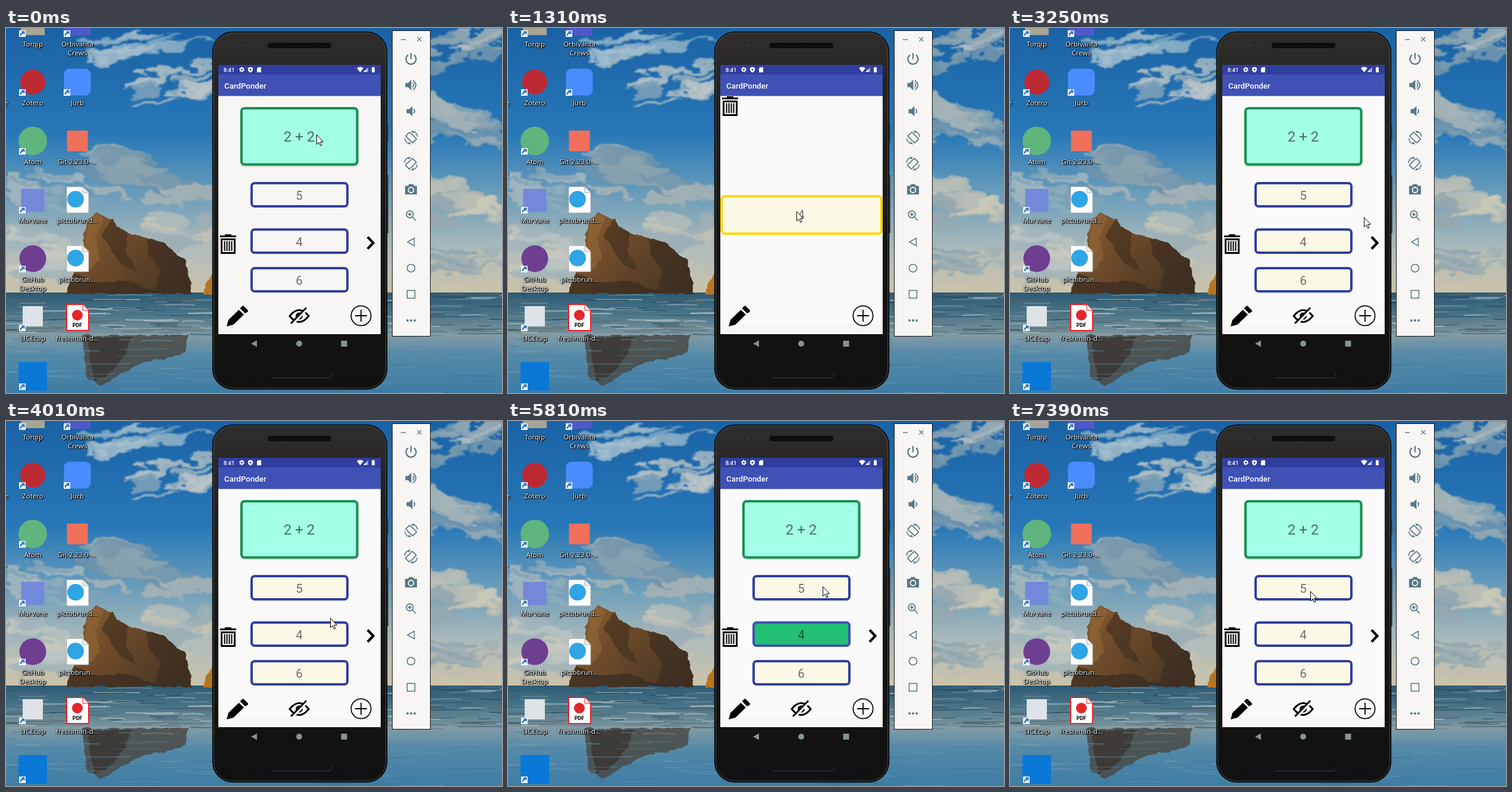
An HTML page for the animation above (7.99 s loop, 834x614 px).

```html
<!DOCTYPE html>
<html lang="en">
<head>
<meta charset="utf-8">
<title>Flash cards in a phone emulator</title>
<style>
  html, body { margin: 0; width: 100%; height: 100%; overflow: hidden; background: #1a65ab; }
  svg { display: block; width: 834px; height: 614px; }
  text { font-family: Roboto, sans-serif; text-anchor: middle; }
  .label text { font: 11.6px "Open Sans", sans-serif; fill: #fff; }
  .label { filter: drop-shadow(1px 1px 0 #000) drop-shadow(0 0 1px #000); }
  .side { fill: none; stroke: #587885; stroke-width: 1.8; }
  .side .solid { fill: #587885; stroke: none; }
</style>
</head>
<body>
<svg viewBox="0 0 834 614" xmlns="http://www.w3.org/2000/svg">
  <defs>
    <linearGradient id="sky" x2="0" y2="1">
      <stop offset="0" stop-color="#1a62a5"/><stop offset=".4" stop-color="#2878b8"/>
      <stop offset=".6" stop-color="#6299ba"/><stop offset=".85" stop-color="#b2bdba"/>
      <stop offset="1" stop-color="#cdc3a8"/>
    </linearGradient>
    <linearGradient id="sea" x2="0" y2="1">
      <stop offset="0" stop-color="#2c5a74"/><stop offset=".5" stop-color="#4b7689"/><stop offset="1" stop-color="#839aa2"/>
    </linearGradient>
    <linearGradient id="sand" x2="0" y2="1">
      <stop offset="0" stop-color="#869da5"/><stop offset=".35" stop-color="#558aa8"/><stop offset="1" stop-color="#3f7ca4"/>
    </linearGradient>
    <linearGradient id="rock" x2="1" y2=".5">
      <stop offset="0" stop-color="#8d6336"/><stop offset=".45" stop-color="#6f4c2b"/><stop offset="1" stop-color="#4d3824"/>
    </linearGradient>
    <linearGradient id="shell" x2="0" y2="1">
      <stop offset="0" stop-color="#302e2d"/><stop offset=".15" stop-color="#252423"/><stop offset=".6" stop-color="#151515"/><stop offset="1" stop-color="#111"/>
    </linearGradient>
    <filter id="ragged" filterUnits="userSpaceOnUse" x="0" y="0" width="834" height="447">
      <feTurbulence type="fractalNoise" baseFrequency=".02 .04" numOctaves="4" seed="8" result="noise"/>
      <feDisplacementMap in="SourceGraphic" in2="noise" scale="45" xChannelSelector="R" yChannelSelector="G"/>
      <feGaussianBlur stdDeviation="1.2"/>
    </filter>
    <filter id="rough">
      <feTurbulence type="fractalNoise" baseFrequency=".08" numOctaves="2" seed="3" result="noise"/>
      <feDisplacementMap in="SourceGraphic" in2="noise" scale="7" xChannelSelector="R" yChannelSelector="G"/>
    </filter>
    <filter id="soft"><feDropShadow dx="0" dy="1" stdDeviation="1.2" flood-opacity=".3"/></filter>
    <pattern id="mesh" x="440" y="25" width="4" height="4" patternUnits="userSpaceOnUse">
      <path d="M0 0H4V4H0Z" fill="#080808"/><path d="M1 1h1v1H1zM3 3h1v1H3z" fill="#353331"/>
    </pattern>
  </defs>

  <rect width="834" height="447" fill="url(#sky)"/>
  <g id="clouds" filter="url(#ragged)"></g>
  <rect y="445" width="834" height="75" fill="url(#sea)"/>
  <rect y="514" width="834" height="100" fill="url(#sand)"/>
  <g filter="url(#rough)">
    <path d="M128 517H306L302 546 270 556 232 562 196 580 160 602 136 590Z" fill="#4b4a47" opacity=".85"/>
    <path d="M136 520H212L200 552 172 584 148 596Z" fill="#352f2a" opacity=".7"/>
    <path d="M101 447 111 420 121 394 131 372 130 346 138 322 152 310 165 317 178 322 190 338 206 345 236 352 264 361 285 379 300 388 308 414 312 447Z" fill="url(#rock)"/>
    <path d="M178 322 190 338 206 345 201 375 220 410 190 395 176 370 160 350Z" fill="#42301f" opacity=".65"/>
    <path d="M236 352 264 361 285 379 300 388 308 414 312 447H248L260 407 240 381Z" fill="#3a2b1f" opacity=".6"/>
    <path d="M101 447 116 413 150 428 200 425 260 447Z" fill="#35291f" opacity=".65"/>
    <path d="M138 324 152 312 164 320 150 354 158 386 140 409 119 407 133 372Z" fill="#9a6c39" opacity=".5"/>
    <path d="M330 448 338 428 350 410V448Z" fill="#b57624"/>
  </g>
  <g id="waves" fill="none" stroke-linecap="round"></g>

  <g id="icons"></g>
  <g id="labels" class="label"></g>

  <path d="M640 164h3v27h-3zM640 247h3v98h-3z" fill="#4a4741"/>
  <rect x="347.5" y="6.500" width="293" height="601" rx="34" fill="url(#shell)" stroke="#0b0b0b" stroke-width="1.500"/>
  <rect x="349.5" y="8.500" width="289" height="597" rx="32" fill="none" stroke="#484541"/>
  <rect x="440" y="25" width="107" height="9" rx="4" fill="url(#mesh)"/>
  <circle cx="403" cy="29.500" r="2" fill="#3d3b3a"/>
  <path d="M445 588.500H544Q548 588.500 548 580" fill="none" stroke="#3b3b3b"/>
  <g fill="#87938f">
    <path d="M412 531 422 525.500V536.500Z"/><circle cx="493" cy="531" r="5"/><path d="M563.500 526h10v10h-10z"/>
  </g>

  <rect x="357" y="62" width="273" height="453" fill="#f8f6f4"/>
  <rect id="page" x="357" y="114" width="273" height="385" fill="#fafafa"/>
  <rect x="357" y="114" width="273" height="1" fill="#3f51b5" opacity=".4"/>
  <rect x="357" y="62" width="273" height="16" fill="#303f9f"/>
  <rect x="357" y="78" width="273" height="36" fill="#3f51b5"/>
  <g fill="#fff">
    <text x="375" y="74" font-size="9.500" font-weight="500">8:41</text>
    <text x="367" y="101.500" font-size="13.300" font-weight="500" style="text-anchor:start">CardPonder</text>
    <circle cx="396.500" cy="70" r="2.500" fill="none" stroke="#fff" stroke-width="1.800"/>
    <circle cx="396.500" cy="70" r="3.900" fill="none" stroke="#fff" stroke-width="1.200" stroke-dasharray="1.700 2.380"/>
    <path d="M411 65.500 415 67V70Q415 73 411 75 407 73 407 70V67Z"/>
    <path d="M424 66H429V74.500H422V68Z"/>
    <path d="M590 67.500Q595.500 63.500 601 67.500L595.500 74.500Z"/>
    <path d="M609 66V74H601Z" opacity=".55"/><path d="M605.500 69.500V74H601Z"/>
    <path d="M615 66.500H616.500V65.500H618.500V66.500H620V74.500H615Z"/>
  </g>
  <circle cx="411" cy="70" r="1.500" fill="#303f9f"/>

  <g id="quiz">
    <rect x="396" y="135" width="194.500" height="94.500" rx="5" fill="#a3ffe6" stroke="#159052" stroke-width="4" filter="url(#soft)"/>
    <text x="493" y="191" font-size="24" fill-opacity=".56">2 + 2</text>
    <g id="answers"></g>
    <path d="M608 351.500 617.500 361.500 608 371.500" fill="none" stroke="#000" stroke-width="4.200"/>
    <g fill="none" stroke="#000" stroke-width="3">
      <path d="M477 484.500Q485 474.500 493 474.500T509 484.500Q501 494.500 493 494.500T477 484.500Z"/>
      <circle cx="493" cy="484.500" r="4.500"/>
      <path d="M481 499 507 472" stroke="#f9f8f7" stroke-width="4"/><path d="M479 497 505 470.500"/>
    </g>
  </g>
  <g id="reveal">
    <rect x="359" y="283" width="269" height="63" rx="6" fill="#fcf8e6" stroke="#ffd600" stroke-width="4"/>
    <text x="493" y="321" font-size="20" fill-opacity=".54">4</text>
  </g>
  <g id="trash" fill="none" stroke="#000">
    <path d="M360 350.500H387" stroke-width="3"/><path d="M369 350V348H378V350" stroke-width="2"/>
    <path d="M362.500 355.500H384.500V378.500H362.500Z" stroke-width="3"/>
    <path d="M367.500 358.500V375M371.500 358.500V375M375.500 358.500V375M379.500 358.500V375" stroke-width="2"/>
  </g>
  <path d="M371 502 374 491 391.500 474 400 482 382.500 499ZM393.500 471.500 397 468Q398.500 466.500 400 468L406.500 474.500Q407.500 476 406.500 477.500L402 480Z"/>
  <circle cx="597" cy="484" r="16.700" fill="none" stroke="#000" stroke-width="1.700"/>
  <path d="M587 484H607M597 474V494" stroke="#000" stroke-width="1.800"/>

  <rect x="649.500" y="4.500" width="64" height="514" fill="#f8f6f4" stroke="#111"/>
  <g class="side">
    <path d="M664 19.500H672M691.500 15.500 698.500 22.500M698.500 15.500 691.500 22.500" stroke-width="1.300"/>
    <path d="M676 45.500A8.500 8.500 0 1 0 686 45.500M681 42V52.500" stroke-width="2.200"/>
    <path class="solid" d="M671.500 92.500H676L681.500 87V105L676 99.500H671.500Z"/>
    <path d="M684 92Q687.500 96 684 100M684.500 88Q694 96 684.500 104"/>
    <path class="solid" d="M673.500 136.500H678L683.500 131.500V148.500L678 143.500H673.500Z"/>
    <path d="M685.500 136.500Q689 140 685.500 143.500"/>
    <g id="rotate">
      <rect x="676.500" y="176" width="9.500" height="16.500" rx=".8" transform="rotate(-45 681.250 184.250)"/>
      <path d="M682 173.500Q691 174 692 183M680.500 195Q671.500 194.500 670.500 185.500" stroke-width="1.500"/>
      <path class="solid" d="M681 172.800 687 174.500 684.500 177ZM681.500 195.700 675.500 194 678 191.500Z"/>
    </g>
    <use href="#rotate" transform="matrix(-1 0 0 1 1362 44)"/>
    <path class="solid" d="M671 265.500H676L678 262.500H684L686 265.500H691V280H671Z"/>
    <circle cx="681" cy="272.500" r="4.500" stroke="#f8f6f4"/>
    <circle cx="679" cy="313.500" r="5.800"/><path d="M683.500 318 689 324M676 313.500H682M679 310.500V316.500"/>
    <path d="M675 360 686.500 353.500V366.500Z" stroke-width="1.500"/>
    <circle cx="681" cy="404" r="6.500" stroke-width="1.600"/>
    <rect x="674.500" y="441.500" width="13" height="13" stroke-width="1.600"/>
    <path d="M675 492H675.100M681 492H681.100M687 492H687.100" stroke-width="3.800" stroke-linecap="round"/>
  </g>

  <path id="cursor" d="M.500.700V16.700L4.200 13.200 6.700 19 9 18 6.600 12.300H11.500Z" fill="#fff" stroke="#000"/>
</svg>
<script>
const $ = id => document.getElementById(id);
const LOOP = 7990;

let seed = 17;
const random = () => (seed = seed * 16807 % 2147483647) / 2147483647;
const spread = size => (random() - .5) * 2 * size;

// Cloud banks: centre, half size, tilt, shades; each is a bundle of thin streaks
const banks = [
  [250, 18, 105, 24, -10, ["#7fa9c4", "#a4bfcd", "#92b3c6"]],
  [285, 95, 80, 30, -12, ["#a6b9c1", "#bcc6c8", "#7fa3b9"]],
  [245, 250, 120, 42, 8, ["#8aa3af", "#a9b3b4", "#7195ab"]],
  [55, 275, 80, 32, 10, ["#7fa3b8", "#a5b8be", "#8dadbd"]],
  [100, 380, 150, 42, 2, ["#b9c3c2", "#c9c9bd", "#a2b4ba"]],
  [300, 355, 70, 45, -4, ["#b3bcba", "#c6c4b5", "#9db0b5"]],
  [775, 32, 80, 34, -14, ["#8fa7b3", "#b1bcc0", "#7799ae"]],
  [760, 165, 95, 40, 10, ["#8ca6b3", "#a9b5b8", "#6e95ae"]],
  [770, 285, 90, 42, -6, ["#b7bdb6", "#cbc9b8", "#96a9b0"]],
  [770, 390, 90, 36, 0, ["#a3b1b3", "#c0bfb0", "#8fa5ad"]]
];
$("clouds").innerHTML = banks.map(([cx, cy, w, h, tilt, shades]) =>
  Array.from({ length: 16 }, (_, i) => {
    const x = cx + spread(w * .75), y = cy + spread(h * .85);
    const rx = w * (.25 + random() * .35), ry = h * (.12 + random() * .2);
    return `<ellipse cx="${x}" cy="${y}" rx="${rx}" ry="${ry}" fill="${shades[i % 3]}" opacity=".85" transform="rotate(${tilt} ${cx} ${cy})"/>`;
  }).join("")).join("");

// Ripples on the water, then fainter ones on the wet sand
const ripples = (count, top, height, shades, opacity) =>
  Array.from({ length: count }, (_, i) => {
    const x = random() * 874 - 40, y = top + random() * height, w = 20 + random() * 65;
    return `<path d="M${x} ${y}q${w / 2} ${spread(2.5)} ${w} 0" stroke="${shades[i % shades.length]}" stroke-width="${.7 + random() * 1.6}" opacity="${opacity}"/>`;
  }).join("");
$("waves").innerHTML =
  ripples(190, 448, 68, ["#b3c0c3", "#2a4f65", "#708e9b", "#5d6a6c"], .7) +
  ripples(80, 518, 96, ["#8ba8b6", "#356f95", "#6d98ae"], .4);

// Desktop icons
const square = (x, y, size, fill, r = 0) =>
  `<rect x="${x - size / 2}" y="${y - size / 2}" width="${size}" height="${size}" rx="${r}" fill="${fill}"/>`;
const disc = (x, y, r, fill) => `<circle cx="${x}" cy="${y}" r="${r}" fill="${fill}"/>`;
const sheet = (y, stroke, r) =>
  `<path d="M${102} ${y - 22}h27l10 10v34h-37z" fill="#fff" stroke="${stroke}" stroke-width="${r}"/>
   <path d="M129 ${y - 22}v10h10" fill="#eee" stroke="${stroke}"/>`;
const shortcut = (x, y) =>
  `<path d="M${x} ${y}h11v11h-11z" fill="#f5f7fa"/>
   <path d="M${x + 2.5} ${y + 9}q0-4 4.500-4.500M${x + 4.5} ${y + 2.5}h4v4" fill="none" stroke="#1261b5" stroke-width="1.800"/>`;

$("icons").innerHTML = [
  square(45, -8, 40, "#a9a596"), square(120, -9, 44, "#5059c9", 4),
  disc(45, 91, 21, "#bd2932"), square(120, 91, 45, "#4a8cff", 9),
  disc(45, 190, 24, "#5fb57d"), square(120, 190, 35, "#f0705c"),
  square(45, 290, 39, "#7289da"), sheet(289, "#aaa", 1), disc(117, 288, 14, "#2fa5e4"),
  disc(45, 388, 22.5, "#6e3e91"), sheet(388, "#aaa", 1), disc(117, 387, 14, "#2fa5e4"),
  square(45, 485, 34, "#dfe2e6"), sheet(487, "#e5252a", 2), disc(120, 483, 9, "#e5252a"),
  `<text x="120" y="503" font-size="9" font-weight="700">PDF</text>`,
  square(45, 586, 48, "#0a78d7"),
  ...[4, 103, 202, 301, 400, 499, 598].map(y => shortcut(22, y)),
  ...[4, 103].map(y => shortcut(97, y))
].join("");

const labels = [
  [45, 31, "Torqip"], [120, 31, "Orbivanta"], [120, 46, "Crews"],
  [45, 130, "Zotero"], [120, 130, "Jurb"], [45, 229, "Atom"], [119, 229, "Git-2.23.0-..."],
  [45, 328, "Murvane"], [120, 328, "pictobrund..."], [45, 427, "GitHub"], [45, 442, "Desktop"],
  [120, 427, "pictobrun..."], [45, 526, "LICEcap"], [120, 526, "freshman-d..."],
  [0, 130, "e"], [0, 246, "."]
];
$("labels").innerHTML = labels.map(([x, y, s]) => `<text x="${x}" y="${y}">${s}</text>`).join("");

// Flash card answers
$("answers").innerHTML = [[259, 5], [337, 4], [402, 6]].map(([y, n]) =>
  `<rect x="413" y="${y + 2}" width="161" height="39" rx="5" stroke="#303f9f" stroke-width="4"/>
   <text x="493" y="${y + 29.5}" font-size="20.500" fill-opacity=".56">${n}</text>`).join("");
const boxes = [...$("answers").querySelectorAll("rect")];

// Pointer positions: time, x, y
const pointer = [
  [0, 522, 179], [1180, 503, 252], [1310, 485, 308], [2810, 509, 257], [2960, 538, 227],
  [3110, 590, 303], [3250, 595, 318], [3370, 600, 332], [3500, 604, 343], [3620, 607, 350],
  [3740, 608, 353], [3890, 575, 342], [4010, 545, 331], [4160, 522, 352], [4280, 507, 366],
  [4580, 507, 362], [5420, 511, 340], [5540, 516, 314], [5660, 521, 293], [5810, 529, 278],
  [5960, 546, 264], [6080, 565, 260], [6210, 585, 274], [6350, 600, 275], [6510, 600, 272],
  [6960, 568, 277], [7090, 538, 282], [7240, 519, 286], [7390, 505, 286]
];

const show = (id, on) => $(id).setAttribute("visibility", on ? "visible" : "hidden");

function draw(t) {
  const revealed = t >= 590 && t < 2240;
  const correct = t >= 5120 && t < 6960;
  show("page", t >= 590);
  show("quiz", !revealed);
  show("reveal", revealed);
  $("trash").setAttribute("transform", `translate(0 ${revealed ? -232 : 0})`);
  boxes.forEach((box, i) => {
    const chosen = correct && i === 1;
    box.setAttribute("fill", chosen ? "#22bf75" : t < 590 ? "#f8f6f4" : "#fcf8e6");
    box.setAttribute("stroke", chosen ? "#3f51b5" : "#303f9f");
  });
  const [, x, y] = pointer.findLast(([start]) => start <= t);
  $("cursor").setAttribute("transform", `translate(${x} ${y})`);
}

const begin = performance.now();
function tick() {
  draw((performance.now() - begin) % LOOP);
  requestAnimationFrame(tick);
}
tick();
</script>
</body>
</html>
```
